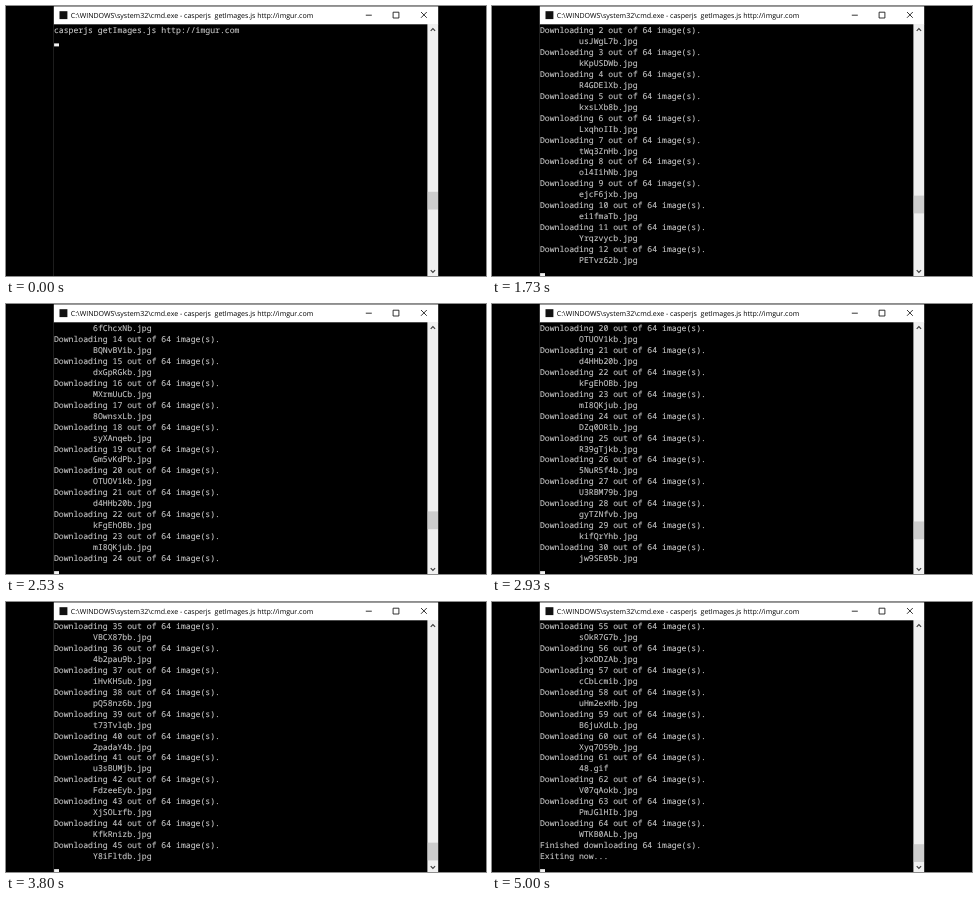
Animation of 480 by 270 pixels, one loop 5070 ms. Source, as an HTML page:

```html
<!DOCTYPE html>
<html lang="en">
<head>
<meta charset="utf-8">
<title>Image download in a console</title>
<style>
  html, body { margin: 0; width: 100%; height: 100%; overflow: hidden; background: #000; }
  svg { display: block; width: 480px; height: 270px; }
  text { white-space: pre; text-rendering: geometricPrecision; }
  .title { font: 7.04px "Open Sans", "Noto Sans", sans-serif; fill: #000; }
  #rows { font: 8.155px "Noto Sans Mono", "DejaVu Sans Mono", monospace; fill: #c8c8c8; stroke: #c8c8c8; stroke-width: .1; }
  .line { fill: none; stroke: #111; stroke-width: .85; }
  .arrow { fill: none; stroke: #404040; stroke-width: 1.2; }
</style>
</head>
<body>
<svg viewBox="0 0 480 270">
  <rect width="480" height="270"/>
  <rect x="47.4" y="18" width=".5" height="252" fill="#3a3a3a"/>
  <rect x="47.8" y=".4" width="384.4" height="17.9" fill="#fff"/>
  <rect x="53.5" y="5.2" width="7.9" height="7.9" fill="#111"/>
  <text class="title" x="64.8" y="11.6">C:\WINDOWS\system32\cmd.exe - casperjs  getImages.js http://imgur.com</text>
  <path class="line" d="M359.8 9.2h6M387.1 6.2h5.8v5.8h-5.8zM415 6l5.8 5.8m0-5.8l-5.8 5.8"/>
  <rect x="421.4" y="18" width="10.8" height="252" fill="#f0f0f0"/>
  <path class="arrow" d="M424.7 24.8l2.2-2.2 2.2 2.2M424.7 264.2l2.2 2.2 2.2-2.2"/>
  <rect id="thumb" x="421.8" width="10.2" height="17.8" fill="#cdcdcd"/>
  <g id="rows"></g>
  <rect id="cursor" x="48.1" width="4.9" height="3" fill="#f2f2f2"/>
</svg>
<script>
const LOOP = 5070, TICK = 1000 / 15;
const ROWS = 22, PITCH = 10.94, LEFT = 47.9, TAB = 39.1;

const files = `8olCb1Qb usJWgL7b kKpUSDWb R4GDElXb kxsLXb8b LxqhoIIb tWq3ZnHb ol4IihNb
ejcF6jxb ei1fmaTb Yrqzvycb PETvz62b 6fChcxNb BQNvBVib dxGpRGkb MXrmUuCb
8OwnsxLb syXAnqeb Gm5vKdPb OTUOV1kb d4HHb20b kFgEhOBb mI8QKjub DZq0OR1b
R39gTjkb 5NuR5f4b U3RBM79b gyTZNfvb kifQrYhb jw9SE05b c7RwLzXb Qh2nVsEb
aJ6tMyDb N9fkUpob VBCX87bb 4b2pau9b iHvKH5ub pQ58nz6b t73Tvlqb 2padaY4b
u3sBUMjb FdzeeEyb XjSOLrfb KfkRnizb Y8iFltdb XQbcjvUb pjvr3h4b DLm0A1tb
5paMStpb WcsMsBab 4Z834Z9b QAGLxFmb ulnXcNYb iFY888rb sOkR7G7b jxxDDZAb
cCbLcmib uHm2exHb B6juXdLb Xyq7O59b 48.gif V07qAokb PmJGlHIb WTKB0ALb`.split(/\s+/);
const total = files.length;

const lines = [
  "casperjs getImages.js http://imgur.com",
  "Begin to download all the images...",
  `There are in total of ${total} image(s).`,
  ...files.flatMap((name, i) => [
    `Downloading ${i + 1} out of ${total} image(s).`,
    "\t" + (name.includes(".") ? name : name + ".jpg")
  ]),
  `Finished downloading ${total} image(s).`,
  "Exiting now..."
];

// New lines printed on each tick, from the first output on
const FIRST = 17;
const printed = "33333223" + "223122202" + "22232223222" + "33330" + "42042042" + "223032222" + "0323333" + "32";
const counts = [1];
for (const d of printed) counts.push(counts[counts.length - 1] + Number(d));

const $ = id => document.getElementById(id);
const thumb = $("thumb"), cursor = $("cursor");
const rows = Array.from({ length: ROWS }, (_, r) => {
  const el = document.createElementNS("http://www.w3.org/2000/svg", "text");
  el.setAttribute("y", 27.2 + r * PITCH);
  return $("rows").appendChild(el);
});

function draw(tick) {
  const step = Math.min(Math.max(tick - FIRST + 1, 0), counts.length - 1);
  const count = counts[step];
  const top = Math.max(0, count - ROWS);
  rows.forEach((el, r) => {
    const line = top + r < count ? lines[top + r] : "";
    el.setAttribute("x", line[0] === "\t" ? LEFT + TAB : LEFT);
    el.textContent = line.trim();
  });
  cursor.setAttribute("y", 26.46 + (count - top) * PITCH);
  cursor.setAttribute("visibility", tick >= 6 && tick < 14 ? "hidden" : "visible");
  // 300-line buffer on a 232 px track
  thumb.setAttribute("y", 28 + (204 + Math.min(top, 73)) * 232 / 300);
}

const start = performance.now();
let shown = -1;
function frame() {
  const t = (performance.now() - start) % LOOP;
  const tick = Math.floor((t + 4) / TICK);
  if (tick !== shown) draw(shown = tick);
  requestAnimationFrame(frame);
}
frame();
</script>
</body>
</html>
```
